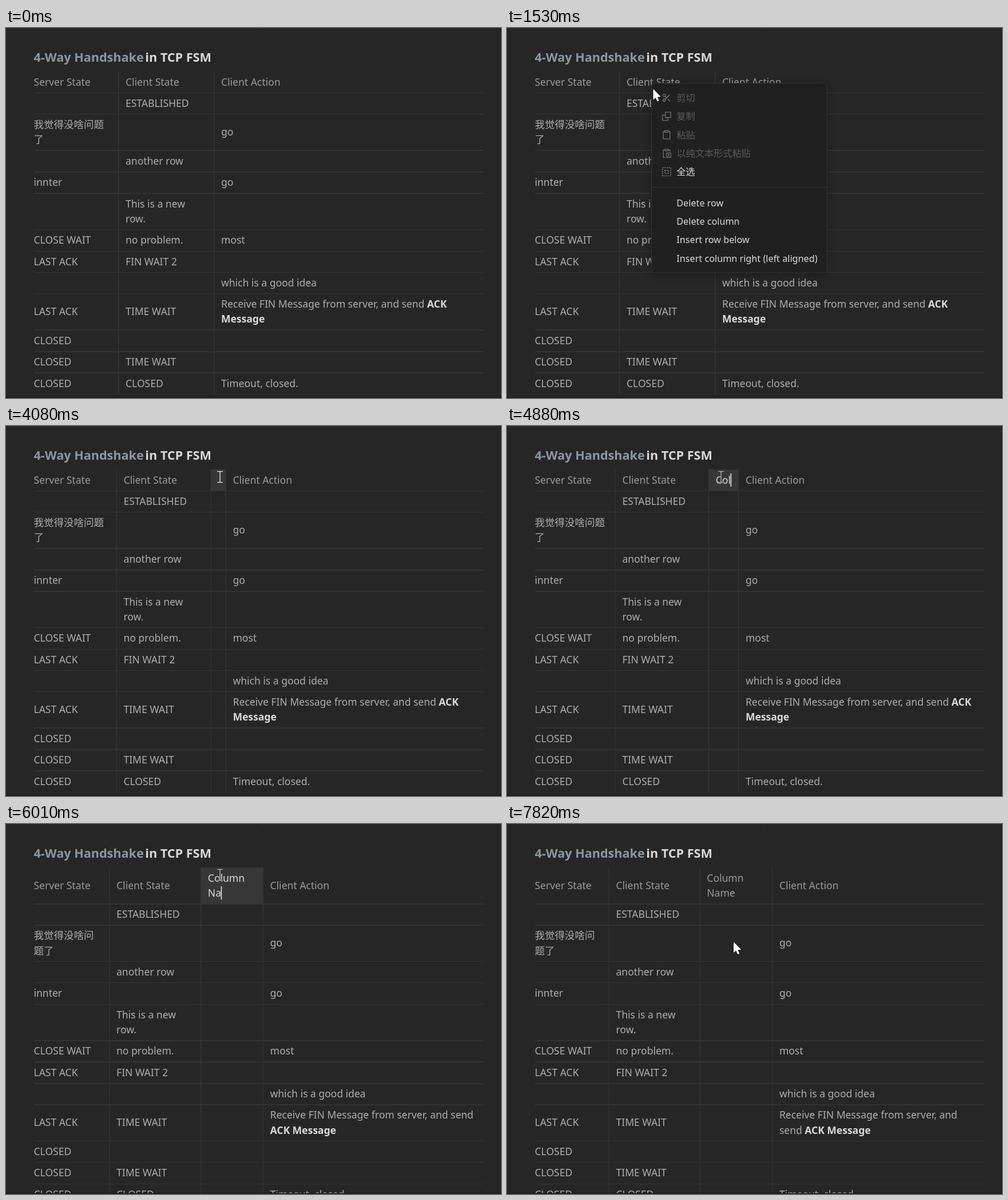
These frames come from a looping animation (865x647 px, 8000 ms). An HTML page with a canvas:

```html
<!DOCTYPE html>
<html lang="zh-CN">
<head>
<meta charset="utf-8">
<title>Table editing</title>
<style>
html, body { margin: 0; width: 100%; height: 100%; overflow: hidden; background: #262626; }
canvas { display: block; }
</style>
</head>
<body>
<canvas id="stage" width="865" height="647"></canvas>
<script>
const ctx = document.getElementById('stage').getContext('2d');
const FAMILY = '"Noto Sans", "Noto Sans CJK SC", sans-serif';
const LOOP = 8000, LEFT = 48.5, RIGHT = 834, TOP = 76, PAD = 13;
const SIZE = 17.5, LINE = 26.25, ROW = 37.4;
const GRID = '#353535', TEXT = '#adadad', DIM = '#9a9a9a', BRIGHT = '#dadada';
const INSERT = 2840, FOCUS = 3190, CARET = 3530, BLUR = 7820;
const TYPED = 'Column Name';
const KEYS = [4480, 4750, 4880, 5150, 5350, 5480, 5680, 5880, 5990, 6110, 6280];

const lerp = (a, b, k) => a + (b - a) * k;
const font = (size, weight = 400) => { ctx.font = `${weight} ${size}px ${FAMILY}`; };

function rect(x, y, w, h, color) {
  ctx.fillStyle = color;
  ctx.fillRect(x, y, w, h);
}

function width(text) {
  font(SIZE);
  return ctx.measureText(text).width;
}

// Lines are centred on mid; parts between ** are bold.
function label(text, x, mid, color) {
  const lines = text.split('\n');
  lines.forEach((line, i) => {
    const y = mid + (i - (lines.length - 1) / 2) * LINE + 6.2;
    let at = x;
    line.split('**').forEach((part, j) => {
      font(SIZE, j % 2 ? 700 : 400);
      ctx.fillStyle = j % 2 ? BRIGHT : color;
      ctx.fillText(part, at, y);
      at += ctx.measureText(part).width;
    });
  });
}

function tableRows(n) {
  const message = n < 5 ? 'Receive FIN Message from server, and send **ACK**\n**Message**'
    : n < 10 ? 'Receive FIN Message from server, and send\n**ACK Message**'
    : 'Receive FIN Message from server, and\nsend **ACK Message**';
  return [
    ['Server State', 'Client State', 'Client Action'],
    ['', 'ESTABLISHED', ''],
    [n < 6 ? '我觉得没啥问题\n了' : '我觉得没啥问\n题了', '', 'go'],
    ['', 'another row', ''],
    ['innter', '', 'go'],
    ['', 'This is a new\nrow.', ''],
    ['CLOSE WAIT', 'no problem.', 'most'],
    ['LAST ACK', 'FIN WAIT 2', ''],
    ['', '', 'which is a good idea'],
    ['LAST ACK', 'TIME WAIT', message],
    ['CLOSED', '', ''],
    ['CLOSED', 'TIME WAIT', ''],
    ['CLOSED', 'CLOSED', 'Timeout, closed.']
  ];
}

// Column rules: the new column takes its width from the others.
function separators(t, n) {
  if (t < INSERT) return [196, 363];
  const text = TYPED.slice(0, n);
  const wide = n > 7;
  const w = wide ? 90 + 0.666 * width(text.slice(6)) : 26 + width(text);
  const k = wide ? (w - 95) / 31 : (w - 26) / 69;
  const from = wide ? [182, 342.6, 437.5] : [192.4, 357.4, 383.5];
  const to = wide ? [177.5, 336.3, 463] : [182, 342.6, 437.5];
  return from.map((x, i) => lerp(x, to[i], k));
}

function drawTable(t) {
  const n = KEYS.filter(k => k <= t).length;
  const seps = separators(t, n);
  const rows = tableRows(n);
  const head = n > 7 ? 'Column\n' + TYPED.slice(7, n) : TYPED.slice(0, n);
  const headH = n > 7 ? ROW + LINE : ROW;
  const focused = t >= FOCUS && t < BLUR;

  let y = TOP - 0.4, doubles = 0;
  rows.forEach((cells, r) => {
    const twoLines = r ? cells.some(c => c.includes('\n')) : n > 7;
    const h = twoLines ? 63.5 : ROW;
    doubles += twoLines;
    const xs = [LEFT, seps[0] + PAD, seps[seps.length - 1] + PAD];
    cells.forEach((c, i) => label(c, xs[i], y + h / 2, r ? TEXT : DIM));
    y += h;
    if (r < rows.length - 1) {
      const thick = doubles % 2;
      rect(49, Math.round(y - thick / 2), RIGHT - 49, 1 + thick, thick ? '#333' : GRID);
    }
  });
  seps.forEach(x => rect(x, TOP, 1.25, y - TOP, GRID));

  if (t < INSERT) return;
  const x = seps[1] + PAD;
  if (focused) {
    ctx.globalAlpha = Math.min(1, (1 + Math.floor((t - FOCUS) / 100)) / 3);
    rect(seps[1] + 0.6, TOP, seps[2] - seps[1], headH - 0.6, '#373737');
    ctx.globalAlpha = 1;
  }
  label(head, x, TOP - 0.4 + headH / 2, focused ? BRIGHT : DIM);
  const last = n ? KEYS[n - 1] : CARET;
  if (focused && t >= CARET && (t - last) % 1080 < 540) {
    const line = head.split('\n').pop();
    rect(x + width(line) - 0.4, n > 7 ? 109 : 83, 1.6, 23, '#e4e4e4');
  }
}

function drawTitle() {
  font(21.6, 600);
  ctx.fillStyle = '#8799a3';
  ctx.fillText('4-Way Handshake', LEFT, 59.3);
  ctx.fillStyle = BRIGHT;
  ctx.fillText('in TCP FSM', 243.3, 59.3);
}

// Icons on a 24 unit grid
const ICONS = [
  'M9 6a3 3 0 1 1-6 0a3 3 0 1 1 6 0M9 18a3 3 0 1 1-6 0a3 3 0 1 1 6 0M20 4L8.1 15.9M14.5 14.5L20 20M8.1 8.1L12 12',
  'M9 2h13v13H9zM9 9H2v13h13v-7',
  'M8 2h8v4H8zM16 4h4v18H4V4h4',
  'M8 2h8v4H8zM9 22H4V4h4M16 4h4v4M12 11h10v11H12zM15 15h4M15 18h4',
  'M2 2h20v20H2zM8 8h8v8H8z'
].map(d => new Path2D(d));
const EDIT = ['剪切', '复制', '粘贴', '以纯文本形式粘贴', '全选'];
const ACTIONS = ['Delete row', 'Delete column', 'Insert row below', 'Insert column right (left aligned)'];

function drawMenu(t) {
  if (t < 1070 || t >= 2770) return;
  ctx.save();
  ctx.globalAlpha = Math.min(1, (1 + Math.floor((t - 1070) / 65)) / 3);
  ctx.beginPath();
  ctx.roundRect(252.5, 96.5, 307, 331.5, 5);
  ctx.shadowColor = 'rgba(0,0,0,.3)';
  ctx.shadowBlur = 14;
  ctx.shadowOffsetY = 3;
  ctx.fillStyle = '#202020';
  ctx.fill();
  ctx.shadowColor = 'transparent';
  ctx.strokeStyle = '#363636';
  ctx.stroke();
  rect(253, 278, 306, 1, '#363636');

  const item = (text, y, color, weight) => {
    font(16.2, weight);
    ctx.fillStyle = color;
    ctx.fillText(text, 296.3, y + 5.9);
  };
  EDIT.forEach((text, i) => {
    const y = 122 + i * 32.35, all = i === 4;
    item(text, y, all ? BRIGHT : '#5b5b5b', all ? 500 : 400);
    ctx.save();
    ctx.translate(270.3, y - 8.6);
    ctx.scale(0.72, 0.72);
    ctx.lineWidth = 1.9;
    ctx.strokeStyle = all ? '#8c8c8c' : '#707070';
    if (all) ctx.setLineDash([2.5, 2.5]);
    ctx.stroke(ICONS[i]);
    ctx.restore();
  });
  ACTIONS.forEach((text, i) => item(text, 305.8 + i * 32.35, BRIGHT));
  ctx.restore();
}

// Pointer stops: [time, x, y]
const STOPS = [
  [130, 743, 597], [800, 252, 95], [1529, 252, 95], [1530, 255.5, 106.5],
  [2300, 348, 367], [2450, 351.5, 396.5], [INSERT, 351.5, 396.5],
  [3130, 371, 88], [FOCUS, 374, 89], [7000, 374, 89], [7750, 396, 206], [LOOP, 396, 206]
];
const ARROW = new Path2D('M0 0V19L4.2 15.5L7.2 22L10.2 20.6L7.4 14.2L13.3 13.8Z');
const BEAM = new Path2D('M-5-9.5H5M0-9.5V9.5M-5 9.5H5');

function drawPointer(t) {
  if (t < STOPS[0][0]) return;
  const i = STOPS.findIndex(s => s[0] > t);
  const [t0, x0, y0] = STOPS[i - 1], [t1, x1, y1] = STOPS[i];
  const k = (t - t0) / (t1 - t0), e = k * k * (3 - 2 * k);
  const x = lerp(x0, x1, e), y = lerp(y0, y1, e);
  const beam = t < 1530 ? y < 104 : t >= FOCUS && y < 139;
  ctx.save();
  ctx.translate(x, y);
  if (beam) {
    if (t >= KEYS[0]) ctx.globalAlpha = 0.75;
    ctx.strokeStyle = '#222';
    ctx.lineWidth = 3;
    ctx.stroke(BEAM);
    ctx.strokeStyle = '#e2e2e2';
    ctx.lineWidth = 1.5;
    ctx.stroke(BEAM);
  } else {
    ctx.strokeStyle = '#111';
    ctx.lineWidth = 1.5;
    ctx.stroke(ARROW);
    ctx.fillStyle = '#fff';
    ctx.fill(ARROW);
  }
  ctx.restore();
}

function draw(now) {
  const t = now % LOOP;
  rect(0, 0, 865, 647, '#262626');
  rect(448, 0, 1, 1, '#555');
  drawTitle();
  drawTable(t);
  rect(0, 645.5, 865, 1.5, '#1b161a');
  rect(864, 0, 1, 647, '#1f1d1f');
  drawMenu(t);
  drawPointer(t);
}

const start = performance.now();
function tick() {
  draw(performance.now() - start);
  requestAnimationFrame(tick);
}
tick();
</script>
</body>
</html>
```
